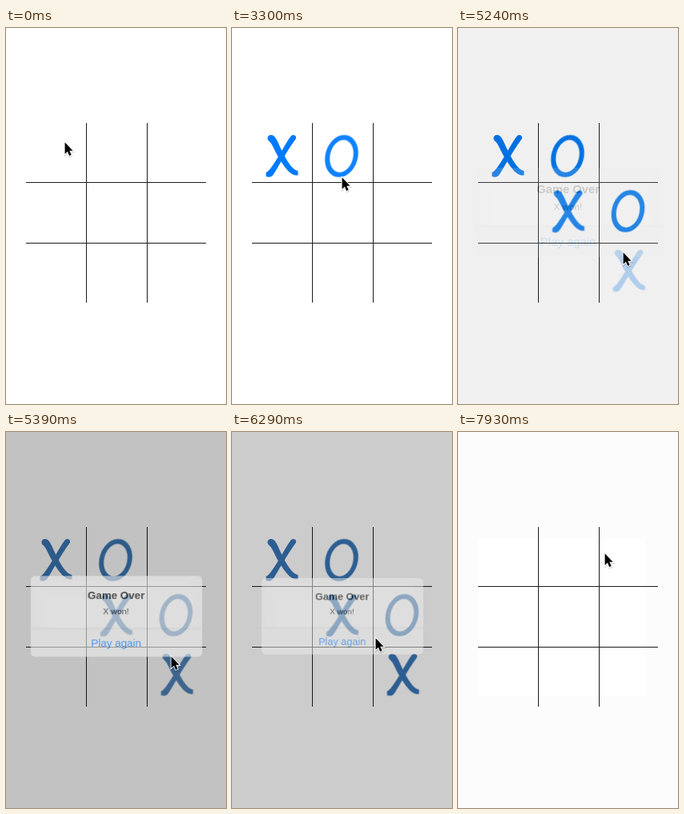
These frames come from a looping animation (275 by 471 pixels, 8000 ms). An HTML page:

```html
<!DOCTYPE html>
<html lang="en">
<head>
<meta charset="utf-8">
<title>Noughts and crosses</title>
<style>
html, body { margin: 0; width: 100%; height: 100%; overflow: hidden; background: #fff; }
svg { display: block; width: 275px; height: 471px; }
text { font-family: "Liberation Sans", Arial, sans-serif; text-anchor: middle; }

/* every part holds its pose until the next change */
#paper, #patch, #marks, .mark, #dim, #alert, #cursor { animation: 8s step-end infinite; }
#paper { animation-name: paper; }
#patch { animation-name: patch; }
#marks { animation-name: tint; }
#m1 { animation-name: m1; }
#m2 { animation-name: m2; }
#m3 { animation-name: m3; }
#m4 { animation-name: m4; }
#m5 { animation-name: m5; }
#dim { animation-name: dim; }
#alert { animation-name: alert; transform-origin: 138px 230.5px; }
#cursor { animation-name: cursor; }

@keyframes paper { 0% { fill: #fff } 80.5% { fill: #fcfcfc } }
@keyframes patch { 0% { opacity: 0 } 84.125% { opacity: 1 } }

@keyframes m1 { 0% { opacity: 0 } 18.75% { opacity: .88 } 20.625% { opacity: 1 } 84.125% { opacity: 0 } }
@keyframes m2 { 0% { opacity: 0 } 41.25% { opacity: .94 } 43.125% { opacity: 1 } 84.125% { opacity: 0 } }
@keyframes m3 { 0% { opacity: 0 } 46.875% { opacity: .9 } 48.75% { opacity: 1 } 84.125% { opacity: 0 } }
@keyframes m4 { 0% { opacity: 0 } 54.375% { opacity: .9 } 56.25% { opacity: 1 } 84.125% { opacity: 0 } }
@keyframes m5 { 0% { opacity: 0 } 65.5% { opacity: .27 } 67.375% { opacity: .9 } 69.25% { opacity: 1 } 84.125% { opacity: 0 } }

@keyframes tint {
  0% { color: #007aff }
  65.5% { color: #0078f0 }
  67.375% { color: #3b77b4 }
  69.25% { color: #63748a }
  71.125% { color: #707070 }
  78.625% { color: #3876b6 }
  80.5% { color: #007aff }
}
@keyframes dim {
  0% { opacity: 0 }
  65.5% { opacity: .06 }
  67.375% { opacity: .24 }
  69.25% { opacity: .36 }
  71.125% { opacity: .4 }
  78.625% { opacity: .2 }
  80.5% { opacity: 0 }
}
@keyframes alert {
  0% { opacity: 0; transform: scale(1.17) }
  65.5% { opacity: .16; transform: scale(1.17) }
  67.375% { opacity: .6; transform: scale(1.06) }
  69.25% { opacity: .92; transform: scale(1.01) }
  71.125% { opacity: 1; transform: none }
  78.625% { opacity: .5; transform: none }
  80.5% { opacity: .012; transform: none }
  84.125% { opacity: 0; transform: none }
}
@keyframes cursor {
  0% { transform: translate(73px, 143px) }
  22.5% { transform: translate(95px, 172px) }
  24.375% { transform: translate(125px, 222px) }
  26.25% { transform: translate(137px, 242px) }
  33.75% { transform: translate(137px, 164px) }
  35.625% { transform: translate(137px, 187px) }
  43.125% { transform: translate(137px, 200px) }
  45% { transform: translate(138px, 232px) }
  48.75% { transform: translate(150px, 233px) }
  50.625% { transform: translate(185px, 232px) }
  52.5% { transform: translate(200px, 230px) }
  56.25% { transform: translate(200px, 236px) }
  58.125% { transform: translate(202px, 255px) }
  60% { transform: translate(205px, 275px) }
  61.875% { transform: translate(206px, 281px) }
  71.125% { transform: translate(200px, 275px) }
  73% { transform: translate(186px, 263px) }
  74.875% { transform: translate(179px, 258px) }
  89.75% { transform: translate(175px, 258px) }
  91.625% { transform: translate(158px, 250px) }
  93.5% { transform: translate(144px, 225px) }
  95.375% { transform: translate(150px, 190px) }
  97.25% { transform: translate(172px, 160px) }
  99.125% { transform: translate(183px, 152px) }
}
</style>
</head>
<body>
<svg viewBox="0 0 275 471">
  <defs>
    <g id="x" fill="currentColor">
      <path d="M2.5 6C2 1 7 0 10 2C14 5 16 12 20.5 21C26 32 33 45 40.5 46V51.5C30 53 22 38 15.5 28C11 20 8 11 3.5 8Z"/>
      <path d="M32 2C35 -.5 39 2 38 5.5C34 11 28 20 24 27C18 36 12 48 8.5 52C6 54.5 3 53.5 .5 53V48C5 46 11 36 16 28C21 20 27 8 32 2Z"/>
    </g>
    <ellipse id="o" rx="17.6" ry="23.4" transform="skewX(-7)" fill="none" stroke="currentColor" stroke-width="6"/>
  </defs>

  <rect id="paper" width="275" height="471"/>
  <rect id="patch" x="25" y="133" width="209" height="198" fill="#fff"/>

  <g id="marks">
    <use id="m1" class="mark" href="#x" x="42" y="133"/>
    <use id="m2" class="mark" href="#o" x="137" y="160.5"/>
    <use id="m3" class="mark" href="#x" x="117.5" y="202.5"/>
    <use id="m4" class="mark" href="#o" x="212.5" y="229.5"/>
    <use id="m5" class="mark" href="#x" x="193.3" y="276.7"/>
  </g>
  <path d="M100.5 119V344M176.5 119V344M25 193.5H250M25 269.5H250" stroke="#1c1c1c"/>

  <rect id="dim" width="275" height="471"/>

  <g id="alert">
    <rect x="37" y="183" width="202" height="95.5" rx="5" fill="#ededed"/>
    <rect x="41" y="190" width="188" height="54" rx="10" fill="#f0f0f0"/>
    <rect x="57" y="209" width="48" height="35" rx="3" fill="#f4f4f4"/>
    <path d="M37 245.5H239" stroke="#dadada"/>
    <text x="137.7" y="210" font-size="12.6" font-weight="bold">Game Over</text>
    <text x="137.5" y="228" font-size="10">X won!</text>
    <text x="137.7" y="267" font-size="12.7" fill="#007aff">Play again</text>
  </g>

  <g id="cursor">
    <path d="M1 1.5V16L4.3 12.9L6.6 18.1L9 17L6.7 12H11.2Z" fill="none" stroke="#000" stroke-opacity=".15" stroke-width="2.4"/>
    <path d="M.6 .3V14.8L3.9 11.7L6.2 16.9L8.6 15.8L6.3 10.8H10.6Z" stroke="#fff" stroke-width="1.8" paint-order="stroke"/>
  </g>
</svg>
</body>
</html>
```
